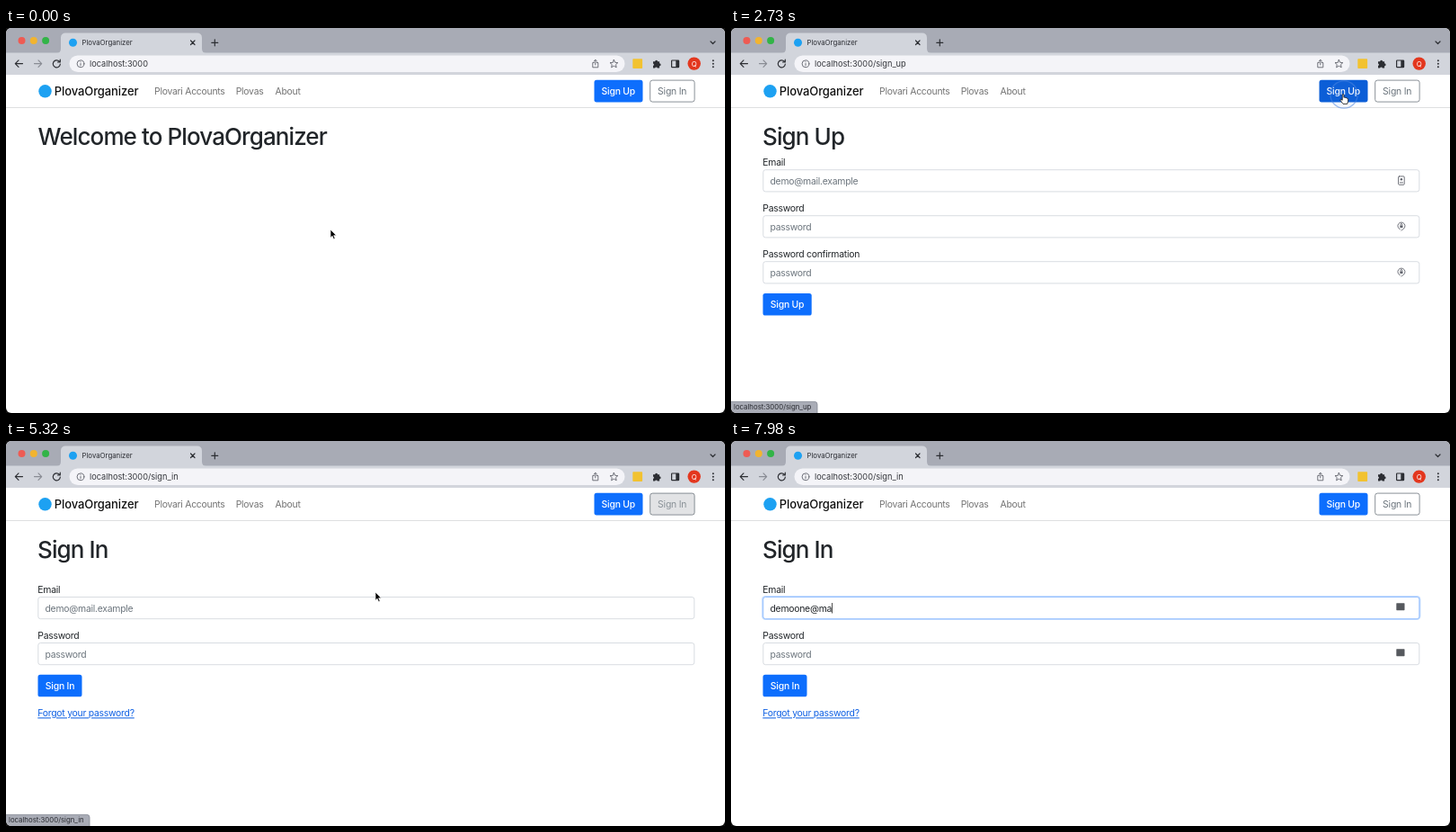
These frames come from a looping animation (800x428 px, 8 s). An HTML page:

```html
<!DOCTYPE html>
<html lang="en">
<head>
<meta charset="utf-8">
<title>PlovaOrganizer</title>
<style>
  html, body { margin: 0; width: 100%; height: 100%; overflow: hidden; background: #111; }
  svg { display: block; width: 100%; height: 100%; }
  text { font: 10.4px Inter, "Open Sans", sans-serif; letter-spacing: -.25px; fill: #212529; white-space: pre; }
  .h1 { font-size: 26px; font-weight: 500; letter-spacing: -.9px; }
  .brand { font-size: 13px; font-weight: 500; letter-spacing: -.1px; fill: #111; }
  .nav { fill: #737373; }
  .url { font-size: 9.2px; letter-spacing: 0; fill: #34363b; }
  .small { font-size: 7.8px; letter-spacing: 0; fill: #2b2d33; }
  .hint { fill: #6c757d; }
  .link { fill: #0d5fe3; text-decoration: underline; }
  .btn { fill: #fff; text-anchor: middle; font-weight: 500; letter-spacing: -.2px; }
  .line { fill: none; stroke: #2c2e33; stroke-width: 1.2; stroke-linecap: round; stroke-linejoin: round; }
  .thin { fill: none; stroke: #60636b; stroke-width: .9; stroke-linecap: round; stroke-linejoin: round; }
</style>
</head>
<body>
<svg id="stage" viewBox="0 0 800 428"></svg>
<script>
const LOOP = 8000, STEP = 70, FADE = 150;
const BLUE = [13, 110, 253], DARK_BLUE = [11, 94, 215];
const GRAY = [108, 117, 125], WHITE = [255, 255, 255];
const HOME_END = 2730, SIGN_UP_END = 4900;
const UP_HOVER = [2020, 3690], IN_HOVER = [3900, 5200];
const STATUS = [[2240, 'sign_up'], [3990, 'sign_in'], [5530, '']];
const CLICKS = [2590, 4650, 5740];
const TYPED = 'demoone@ma', TYPE_START = 7000, TYPE_GAP = 105;
const HINT = 'demo@mail.example';

// time, x, y of the pointer tip
const PATH = [
  [0, 361, 224], [1470, 361, 224], [2060, 681, 73], [3570, 681, 73],
  [3710, 728, 84.5], [3910, 757, 74], [4100, 759, 69], [5160, 759, 69],
  [5320, 411, 168], [5530, 290, 186], [5950, 290, 186], [6160, 286, 130], [LOOP, 286, 130]
];

const text = (x, y, s, cls = '') => `<text x="${x}" y="${y}" class="${cls}">${s}</text>`;
const rect = (x, y, w, h, r, attrs) =>
  `<rect x="${x}" y="${y}" width="${w}" height="${h}" rx="${r}" ${attrs}/>`;
const circle = (x, y, r, attrs) => `<circle cx="${x}" cy="${y}" r="${r}" ${attrs}/>`;
const path = (d, cls = 'line', attrs = '') => `<path d="${d}" class="${cls}" ${attrs}/>`;
const button = (x, y, w, label) =>
  rect(x, y, w, 24.5, 2.6, 'fill="#0d6efd"') + text(x + w / 2, y + 16.2, label, 'btn');
const field = (y, label, hint, id = '') =>
  text(35.3, y - 4.3, label) +
  rect(35.8, y + .3, 730, 24.2, 2.6, `fill="#fff" stroke="#ced4da" stroke-width=".8" ${id && `id="${id}Box"`}`) +
  `<text x="43.5" y="${y + 16.3}" class="hint" ${id && `id="${id}Text"`}>${hint}</text>`;

const personIcon = y => rect(742.6, y - 4.8, 6.6, 9.4, 1, 'class="thin"') +
  circle(745.9, y - 1.5, 1.2, 'fill="#60636b"') + path(`M744.3 ${y + 2.2}h3.2`, 'thin');
const lockIcon = y => path(`M744.4 ${y + 3.6}a4 4 0 1 1 3 0l-1.4 1.4`, 'thin') +
  rect(744.3, y - .8, 3.2, 2.6, .4, 'fill="#60636b"') + path(`M745 ${y - 1}v-.8a.9.9 0 0 1 1.8 0v.8`, 'thin');

const chrome = `
  <rect width="800" height="28" fill="#a8abb5"/>
  <rect y="27.5" width="800" height="24.5" fill="#d2d5dc"/>
  <path d="M56 28q5 0 5-5V11q0-5.5 5.5-5.5h146q5.500 5.500 5.500V23q0 5 5 5z" fill="none"/>
  <path d="M56 28Q61 28 61 23V11Q61 5.500 66.500 5.500H212.500Q218 5.500 218 11V23Q218 28 223 28Z" fill="#d2d5dc"/>` +
  ['#ee5b53', '#f2b42f', '#32b447'].map((c, i) => circle(17.5 + 13.3 * i, 14, 4, `fill="${c}"`)).join('') +
  circle(74.5, 16.3, 4.5, 'fill="#1da1f2"') +
  text(84.5, 19.2, 'PlovaOrganizer', 'small') +
  path('M205.500 14l4.500 4.500m0-4.500l-4.500 4.500M228.800 16.300h7m-3.500-3.500v7') +
  path('M784 15l2.500 2.500 2.500-2.500') +
  path('M18.500 39.600h-8m3.500-3.700l-3.700 3.700 3.700 3.700') +
  path('M31.500 39.600h8m-3.500-3.700l3.700 3.700-3.700 3.700', 'line', 'style="stroke:#898c94"') +
  path('M59.300 37.200a4 4 0 1 0 1 3M60.300 35.200v2.800h-2.800') +
  rect(70.5, 30.4, 618, 18.6, 9.3, 'fill="#f4f4f8"') +
  circle(83, 39.8, 3.9, 'class="thin"') + path('M83 39.500v2.200M83 37.800v.1', 'thin') +
  path('M654.300 38.500h-1.500v5.300h6v-5.300h-1.500M655.800 41v-5.500m-1.800 1.600l1.800-1.700 1.800 1.700', 'thin') +
  path('M676.400 35.400l1.300 2.900 3.100.3-2.300 2.100.7 3.100-2.800-1.600-2.800 1.600.7-3.100-2.300-2.100 3.100-.3z', 'thin') +
  rect(697.3, 34.3, 10.8, 10.8, .8, 'fill="#f2c230"') +
  path('M720 37.200h2.100a1.500 1.500 0 0 1 3 0h2v2.100a1.500 1.500 0 0 1 0 3v2.200h-2.400a1.300 1.300 0 0 0-2.500 0H720v-2.400a1.300 1.300 0 0 0 0-2.500z', '', 'fill="#2c2e33"') +
  rect(740.6, 36, 8, 7.6, .6, 'class="line"') + rect(745.3, 36, 3.4, 7.6, 0, 'fill="#2c2e33"') +
  circle(765.7, 39.6, 7.2, 'fill="#e3371e"') +
  text(765.7, 42.6, 'Q', 'small" text-anchor="middle" style="fill:#fff') +
  [36.3, 39.8, 43.3].map(y => circle(786.8, y, 1, 'fill="#2c2e33"')).join('') +
  '<text id="url" x="93" y="43" class="url"/>';

const navbar =
  '<path d="M0 88.500H800" stroke="#dedfe1"/>' +
  circle(43.5, 70.3, 7.2, 'fill="#1da1f2"') +
  text(53.8, 74.8, 'PlovaOrganizer', 'brand') +
  text(165, 74.2, 'Plovari Accounts', 'nav') +
  text(255.7, 74.2, 'Plovas', 'nav') + text(299.5, 74.2, 'About', 'nav') +
  rect(654.5, 57.8, 54, 24.6, 2.6, 'id="upBox"') + text(681.3, 74.2, 'Sign Up', 'btn') +
  rect(715.5, 56.7, 52, 26.8, 4, 'id="inRing" fill="#6c757d" opacity=".5"') +
  rect(716.7, 58.1, 49.4, 24, 2.6, 'id="inBox" stroke="#6c757d" stroke-width=".8"') +
  '<text id="inLabel" x="741.200" y="74.200" class="btn" style="font-weight:400">Sign In</text>';

const pages = {
  home: text(35.6, 130.2, 'Welcome to PlovaOrganizer', 'h1'),
  signUp: text(35, 130.2, 'Sign Up', 'h1') +
    field(157.4, 'Email', HINT) + field(208.4, 'Password', 'password') +
    field(259.4, 'Password confirmation', 'password') +
    personIcon(169.7) + lockIcon(220.2) + lockIcon(271.2) +
    button(35.5, 295, 54.2, 'Sign Up'),
  signIn: text(35, 130.2, 'Sign In', 'h1') +
    rect(34.2, 171.9, 733.2, 27.2, 4.2, 'id="focusRing" fill="#c2dbfe"') +
    field(173.2, 'Email', HINT, 'email') + field(224.2, 'Password', 'password') +
    '<rect id="caret" y="180" width=".8" height="11.500" fill="#222"/>' +
    '<g id="fieldIcons" fill="#56595e">' +
    rect(740.3, 180.2, 9.2, 8, .6, '') + rect(740.3, 231.2, 9.2, 8, .6, '') + '</g>' +
    button(35.5, 259.8, 49, 'Sign In') +
    text(35.3, 306.4, 'Forgot your password?', 'link')
};

const pointers = {
  arrow: '<path d="M0 0V9.300L2.100 7.300 3.600 10.800 5.200 10.100 3.700 6.700H6.600Z" fill="#000" stroke="#fff" stroke-width=".7"/>',
  hand: '<path d="M-.8 1Q0-.6.9 1V4.200Q2.200 3.500 2.800 4.600 4 4.200 4.400 5.200 5.600 5.100 5.600 6.500V8.300L4.700 11.400H0L-2.800 7.700Q-3.400 6.400-2.200 6.200L-.8 7.300Z" fill="#fff" stroke="#111" stroke-width=".8" stroke-linejoin="round"/>',
  beam: '<path d="M-1.700-5Q0-5 0-4Q0-5 1.700-5M0-4V4M-1.700 5Q0 5 0 4Q0 5 1.700 5" fill="none" stroke="#222" stroke-width=".9"/>'
};

const group = (id, inner) => `<g id="${id}">${inner}</g>`;
const groups = table => Object.entries(table).map(([id, inner]) => group(id, inner)).join('');

document.getElementById('stage').innerHTML =
  '<clipPath id="frame"><rect width="800" height="428" rx="6"/></clipPath>' +
  '<g clip-path="url(#frame)"><rect width="800" height="428" fill="#fff"/>' +
  chrome + navbar + groups(pages) +
  group('status', '<path id="bubble" fill="#a9acb6" stroke="#858893" stroke-width=".8"/>' +
    '<text id="statusText" x="3" y="424.200" class="small"/>') +
  '<circle id="ripple" fill="#4d86e0" fill-opacity=".12" stroke="#4d86e0" stroke-width="1.300"/>' +
  group('pointer', groups(pointers)) + '</g>';

const $ = id => document.getElementById(id);
const show = (id, on) => $(id).style.display = on ? '' : 'none';
const clamp = v => Math.max(0, Math.min(1, v));
const fade = (t, start) => clamp((t - start) / FADE);
const hover = (t, [start, end]) => fade(t, start) - fade(t, end);
const mix = (a, b, k) => `rgb(${a.map((v, i) => Math.round(v + (b[i] - v) * k))})`;

function pointerAt(t) {
  const i = PATH.findIndex((p, n) => n && t <= p[0]);
  const [t0, x0, y0] = PATH[i - 1], [t1, x1, y1] = PATH[i];
  const k = (t - t0) / (t1 - t0), e = k * k * (3 - 2 * k);
  return [x0 + (x1 - x0) * e, y0 + (y1 - y0) * e];
}

function drawPage(t) {
  const page = t < HOME_END ? 'home' : t < SIGN_UP_END ? 'signUp' : 'signIn';
  for (const id in pages) show(id, id === page);
  $('url').textContent = 'localhost:3000' + { home: '', signUp: '/sign_up', signIn: '/sign_in' }[page];

  const inHover = hover(t, IN_HOVER);
  $('upBox').setAttribute('fill', mix(BLUE, DARK_BLUE, hover(t, UP_HOVER)));
  $('inBox').setAttribute('fill', mix(WHITE, GRAY, inHover));
  $('inLabel').style.fill = mix(GRAY, WHITE, inHover);
  show('inRing', t >= CLICKS[1] && t < SIGN_UP_END);

  const route = STATUS.reduce((last, [start, name]) => t >= start ? name : last, '');
  show('status', route);
  $('statusText').textContent = 'localhost:3000/' + route;
  $('bubble').setAttribute('d', `M-1 415.400H${route === 'sign_up' ? 93 : 90}q3 0 3 3V429H-1Z`);
}

function drawForm(t) {
  const focused = fade(t, CLICKS[2]);
  const count = Math.max(0, Math.min(TYPED.length, Math.floor((t - TYPE_START) / TYPE_GAP) + 1));
  const label = $('emailText');
  label.textContent = count ? TYPED.slice(0, count) : HINT;
  label.style.fill = count ? '#212529' : '';
  $('focusRing').setAttribute('opacity', focused);
  $('emailBox').setAttribute('stroke', mix([206, 212, 218], [134, 183, 254], focused));
  show('fieldIcons', t >= 5600);
  show('caret', t >= CLICKS[2] && (count || (t - CLICKS[2]) % 1000 < 500));
  $('caret').setAttribute('x', 43.5 + (count && label.getComputedTextLength()));
}

function drawPointer(t) {
  const [x, y] = pointerAt(t);
  const onButton = y > 58 && y < 82.4 && (x > 654 && x < 708.5 || x > 716 && x < 766);
  const onField = t > SIGN_UP_END && y > 173 && y < 198;
  const kind = onButton ? 'hand' : onField ? 'beam' : 'arrow';
  for (const id in pointers) show(id, id === kind);
  show('pointer', t < TYPE_START);
  $('pointer').setAttribute('transform', `translate(${x} ${y})`);

  const age = Math.min(...CLICKS.map(c => t >= c ? t - c : Infinity)) / 220;
  show('ripple', age < 1);
  if (age < 1) {
    const ripple = $('ripple');
    ripple.setAttribute('cx', x + 1);
    ripple.setAttribute('cy', y + 1);
    ripple.setAttribute('r', 5 + 16 * age);
    ripple.setAttribute('opacity', 1 - .7 * age);
  }
}

const start = performance.now();
function tick() {
  const now = Math.max(0, performance.now() - start) % LOOP;
  const t = Math.floor(now / STEP) * STEP;
  drawPage(t);
  drawForm(t);
  drawPointer(t);
  requestAnimationFrame(tick);
}
tick();
</script>
</body>
</html>
```
